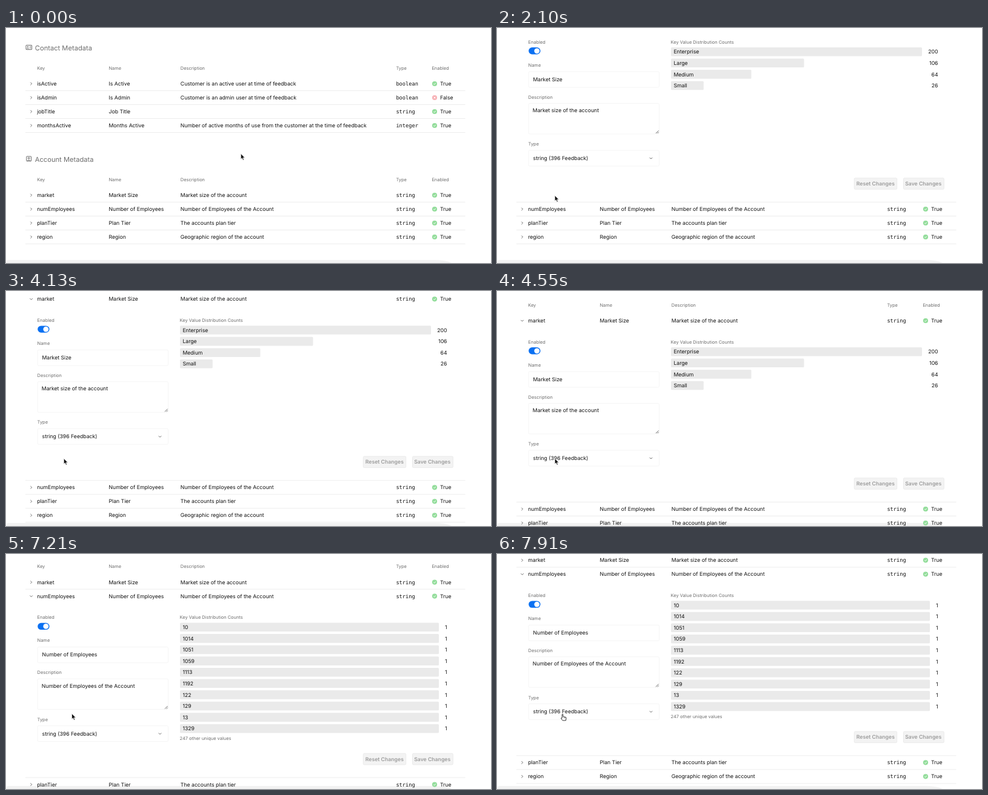
These frames come from a looping animation (800 px wide and 388 px high, 8000 ms). An HTML page:

```html
<!DOCTYPE html>
<html lang="en">
<head>
<meta charset="utf-8">
<title>Metadata settings</title>
<style>
html, body { margin: 0; width: 100%; height: 100%; overflow: hidden; background: #fff; }
svg { display: block; width: 100%; height: 100%; }
text { font: 8.68px Inter, sans-serif; fill: #111; white-space: pre; text-rendering: geometricPrecision; }
.label { font-size: 7.44px; fill: #6e6e6e; }
.title { font-size: 11.16px; fill: #6e6e6e; }
.mono { font-family: "DejaVu Sans Mono", monospace; }
.btn { font-weight: 600; fill: #9c9c9c; }
.end { text-anchor: end; }
.line { fill: none; stroke: #e9e9e9; stroke-width: .8; }
.field { fill: none; stroke: #f3f3f3; stroke-width: .8; }
.icon { fill: none; stroke: #5c5c5c; stroke-width: .9; }
.bar { fill: #eaeaea; }
</style>
</head>
<body>
<svg id="stage" viewBox="0 0 800 388"></svg>
<script>
const LOOP = 8000, STEP = 70, PANEL = 288, ROW = 23;
const COLS = [51.2, 169.5, 287.8, 643.4, 702.4];
const stage = document.getElementById('stage');

const contact = [
  ['isActive', 'Is Active', 'Customer is an active user at time of feedback', 'boolean', true],
  ['isAdmin', 'Is Admin', 'Customer is an admin user at time of feedback', 'boolean', false],
  ['jobTitle', 'Job Title', '', 'string', true],
  ['monthsActive', 'Months Active', 'Number of active months of use from the customer at the time of feedback', 'integer', true]
];
const account = [
  ['market', 'Market Size', 'Market size of the account', 'string', true],
  ['numEmployees', 'Number of Employees', 'Number of Employees of the Account', 'string', true],
  ['planTier', 'Plan Tier', 'The accounts plan tier', 'string', true],
  ['region', 'Region', 'Geographic region of the account', 'string', true]
];
const counts = {
  market: { full: 414, items: [['Enterprise', 200], ['Large', 106], ['Medium', 64], ['Small', 26]] },
  numEmployees: {
    full: 427, note: '247 other unique values',
    items: ['10', '1014', '1051', '1059', '1113', '1192', '122', '129', '13', '1329'].map(n => [n, 1])
  }
};

// y is the middle of the capitals
const SIZE = { label: 7.44, title: 11.16 };
const text = (x, y, s, cls = '') =>
  `<text x="${x}" y="${y + .364 * (SIZE[cls] || 8.68)}" class="${cls}">${s}</text>`;
const rect = (x, y, w, h, r, attrs) =>
  `<rect x="${x}" y="${y}" width="${w}" height="${h}" rx="${r}" ${attrs}/>`;
const path = (d, attrs) => `<path d="${d}" ${attrs}/>`;
const move = (x, y, s) => `<g transform="translate(${x} ${y})">${s}</g>`;
const rule = y => path(`M32 ${y}H757.5`, 'class="line"');

const cardIcon = rect(33, -3.6, 9.6, 7.2, .6, 'class="icon"') +
  '<circle cx="36" cy="-1" r="1.1" fill="#6a6a6a"/>' +
  path('M34.3 2.2q1.7-2 3.4 0M39-1.2h2.2M39 1h2.2', 'class="icon"');
const personIcon = rect(33.8, -4, 7.8, 7.8, .6, 'class="icon"') +
  '<circle cx="37.7" cy="-1" r="1.3" class="icon"/>' +
  path('M35 3.4q2.7-3 5.4 0', 'class="icon"');

const chevron = open => path(open ? 'M39.4-1.1l2.2 2.2 2.2-2.2' : 'M40.4-2.2l2.2 2.2-2.2 2.2', 'class="icon"');

function status(on) {
  const mark = on ? 'M-1.8 .1l1.3 1.3 2.3-2.6' : 'M-1.3-1.3l2.6 2.6M1.3-1.3l-2.6 2.6';
  return move(707, 0, `<circle r="4.1" fill="${on ? '#93dd9b' : '#f7b3b7'}"/>` +
    path(mark, 'fill="none" stroke="#fff" stroke-width="1"')) + text(716, 0, on ? 'True' : 'False');
}

function row([key, name, desc, type, on], open, hover) {
  return (hover ? rect(32, -11.5, 725, ROW, 0, 'fill="#e8e8e8"') : '') + chevron(open) +
    text(COLS[0], 0, key) + text(COLS[1], 0, name) + text(COLS[2], 0, desc) +
    text(COLS[3], 0, type, 'mono') + status(on) + rule(open ? PANEL + 11.5 : 11.5);
}

const field = (y, h) => rect(52, y, 215.5, h, 2, 'class="field"');
const button = (x, w, label, tx) =>
  rect(x, 259.7, w, 18.6, 1.5, 'fill="#f3f3f3" stroke="#e7e7e7" stroke-width=".8"') + text(tx, 269, label, 'btn');

function panel([key, name, desc]) {
  const { full, items, note } = counts[key];
  const top = items[0][1];
  const bars = items.map(([label, n], i) => {
    const y = 51.2 + i * 18.6;
    return rect(287, y - 7.3, full * n / top, 14.6, 1.5, 'class="bar"') +
      text(291.4, y, label) + text(727.5, y, n, 'end');
  }).join('');
  return text(51.6, 35, 'Enabled', 'label') +
    rect(52.2, 44.1, 19.4, 11.4, 5.7, 'fill="#0a70f2"') + '<circle cx="65.8" cy="49.8" r="4.4" fill="#fff"/>' +
    text(51.6, 73, 'Name', 'label') + field(84, 26) + text(59.5, 96.6, name) +
    text(51.6, 126, 'Description', 'label') + field(136.5, 50.5) + text(58.8, 148, desc) +
    path('M262 186l4.6-4.6M264.6 186l2-2', 'class="icon"') +
    text(51.6, 203.5, 'Type', 'label') + field(214, 26) + text(59.6, 227, 'string (396 Feedback)') +
    move(212.4, 227, chevron(true)) +
    text(286.6, 35, 'Key Value Distribution Counts', 'label') + bars +
    (note ? text(286.6, 234.6, note, 'label') : '') +
    button(589.3, 70.4, 'Reset Changes', 592.8) + button(670.5, 66.8, 'Save Changes', 673.2);
}

function section(y, icon, title, rows, openKey, pointer) {
  const head = ['Key', 'Name', 'Description', 'Type', 'Enabled'];
  let out = move(0, y, icon) + text(47.8, y + .5, title, 'title') +
    head.map((h, i) => text(COLS[i], y + 34, h, 'label')).join('');
  let at = y + 60;
  for (const r of rows) {
    const open = r[0] === openKey;
    out += move(0, at, row(r, open, Math.abs(pointer - at) < 11.5) + (open ? panel(r) : ''));
    at += ROW + (open ? PANEL : 0);
  }
  return out;
}

const arrow = path('M0 0V9.2L2.1 7.3 3.6 10.7 5.2 10 3.7 6.7H6.6Z', 'fill="#111" stroke="#fff" stroke-width=".7"');
const hand = path('M-1.2 1.4q.9-.9 1.7 0V5l4 .8q1.3.4 1.1 1.8l-.6 3.8H-.2L-2.9 8q-.2-1.3 1.7-.4Z',
  'fill="#fff" stroke="#222" stroke-width=".9" stroke-linejoin="round"') +
  path('M2 6.2v1.4M3.7 6.4v1.3', 'class="icon"');

const span = (t, a, b) => Math.min(1, Math.max(0, (t - a) / (b - a)));
const ease = p => p * p * (3 - 2 * p);
const glide = p => p ** 1.27;

// each leg: start, end, x, y
const legs = [[0, 560, 95.3, 276.5], [5810, 6370, 85, 354.5], [6580, 7000, 108.5, 263.5]];
function cursorAt(t) {
  let x = 387.3, y = 207.5;
  for (const [a, b, tx, ty] of legs) {
    const p = ease(span(t, a, b));
    x += (tx - x) * p;
    y += (ty - y) * p;
  }
  return [x, y];
}

function scrollAt(t) {
  if (t < 1540) return 0;
  return PANEL - 61 * glide(span(t, 3710, 4550)) + 38.7 * glide(span(t, 7140, 7770));
}

function view(t) {
  const open = t < 1540 ? '' : t < 6650 ? 'market' : 'numEmployees';
  const [x, y] = cursorAt(t), scroll = scrollAt(t);
  const pointing = (t >= 770 && t < 1540) || t >= 7910;
  return path('M1 388V385Q1 383 4 383H706Q726 383 735 388Z', 'fill="#f2f2f2"') +
    move(0, -scroll,
      section(32, cardIcon, 'Contact Metadata', contact, open, y + scroll) +
      section(216, personIcon, 'Account Metadata', account, open, y + scroll)) +
    move(x, y, pointing ? hand : arrow);
}

let last = -1;
function tick(now) {
  const step = Math.floor(now % LOOP / STEP);
  if (step !== last) stage.innerHTML = view((last = step) * STEP);
  requestAnimationFrame(tick);
}
tick(performance.now());
</script>
</body>
</html>
```
